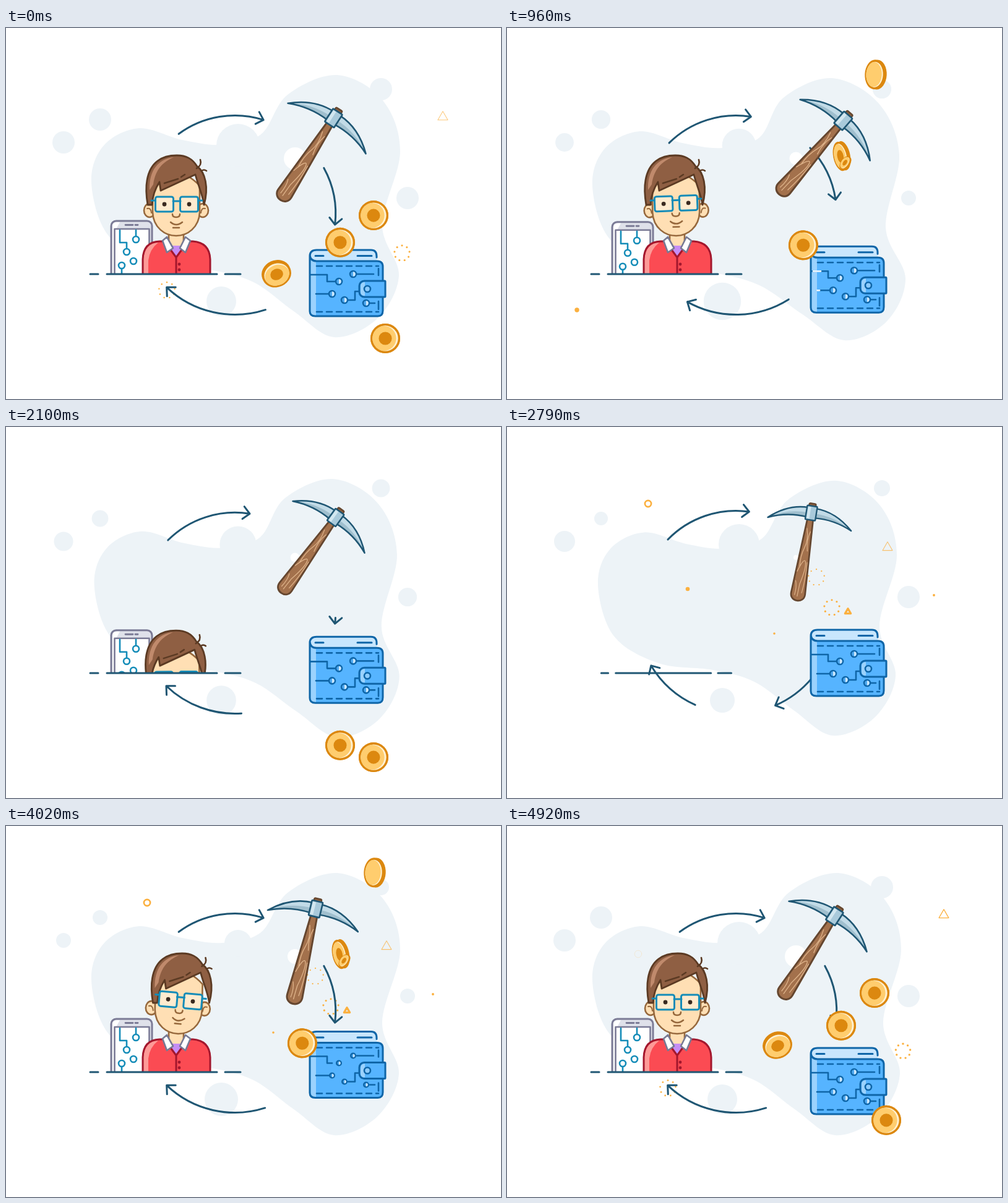
Write an HTML page with a canvas that moves like this. It is 800 by 600 pixels and loops after 4950 ms.

```html
<!DOCTYPE html>
<html lang="en">
<head>
<meta charset="utf-8">
<title>Coin mining cycle</title>
<style>
html, body { margin: 0; width: 100%; height: 100%; overflow: hidden; background: #fff; }
canvas { display: block; width: 800px; height: 600px; }
</style>
</head>
<body>
<canvas id="stage" width="800" height="600"></canvas>
<script>
const c = document.getElementById('stage').getContext('2d');
const T = 4950, TAU = Math.PI * 2, RAD = Math.PI / 180;
const NAVY = '#1f5673', PALE = '#edf3f7', GOLD = '#fbb03f', RIM = '#dc880f', BLUE = '#0f66a8', TEAL = '#148cb8';
const TIMES = [0, 480, 1380, 2790, 3540, 4020, 4920];

const mix = (a, b, u) => a + (b - a) * u;
const clamp = u => Math.min(1, Math.max(0, u));
const smooth = u => u * u * (3 - 2 * u);

// Eased value from [time, value] pairs, wrapping to the first
function key(t, ...list) {
  const k = [...list, [T, list[0][1]]];
  let i = 0;
  while (i < k.length - 2 && t >= k[i + 1][0]) i++;
  const u = clamp((t - k[i][0]) / (k[i + 1][0] - k[i][0]));
  return mix(k[i][1], k[i + 1][1], smooth(u));
}
const pose = (t, ...vals) => key(t, ...vals.map((v, i) => [TIMES[i], v]));

function paint(fill, stroke, width = 3) {
  if (fill) { c.fillStyle = fill; c.fill(); }
  if (stroke) { c.strokeStyle = stroke; c.lineWidth = width; c.stroke(); }
}
function disc(x, y, r, fill, stroke, width) {
  c.beginPath(); c.arc(x, y, Math.max(0, r), 0, TAU); paint(fill, stroke, width);
}
function oval(x, y, rx, ry, fill, stroke, width) {
  c.beginPath(); c.ellipse(x, y, Math.max(.5, rx), ry, 0, 0, TAU); paint(fill, stroke, width);
}
function shape(d, fill, stroke, width = 3) {
  const p = new Path2D(d);
  if (fill) { c.fillStyle = fill; c.fill(p); }
  if (stroke) { c.strokeStyle = stroke; c.lineWidth = width; c.stroke(p); }
}
function box(x, y, w, h, r, fill, stroke, width) {
  c.beginPath(); c.roundRect(x, y, w, h, r); paint(fill, stroke, width);
}
function group(fn) { c.save(); fn(); c.restore(); }

// ---- background
const outline = [
  [138, 250], [158, 190], [215, 162], [285, 181], [350, 189], [412, 172], [455, 108],
  [535, 76], [608, 116], [637, 200], [608, 318], [635, 400], [600, 470], [530, 500],
  [465, 458], [400, 411], [330, 391], [240, 380], [165, 335]
];
const right = x => clamp((x - 200) / 250);
const wide = ([x, y]) => [x, y];
const sheared = ([x, y]) => [x + right(x) * (.06 * (y - 300) + 3), y + 5];
const shrunk = ([x, y]) => [x * .968 + 13.4, y * .972 + 13];
const leaning = ([x, y]) => [
  x * .936 + 26 + .13 * (y - 390) * right(x),
  y * .913 + 21.6 + 18 * clamp((400 - x) / 100)
];
const moods = [wide, sheared, sheared, shrunk, leaning, wide, wide];

function blob(t) {
  const p = outline.map(q => [0, 1].map(k => pose(t, ...moods.map(m => m(q)[k]))));
  const n = p.length, at = i => p[(i + n) % n];
  c.beginPath();
  c.moveTo(...p[0]);
  for (let i = 0; i < n; i++) {
    const [a, b, d, e] = [at(i - 1), at(i), at(i + 1), at(i + 2)];
    c.bezierCurveTo(
      b[0] + (d[0] - a[0]) / 6, b[1] + (d[1] - a[1]) / 6,
      d[0] - (e[0] - b[0]) / 6, d[1] - (e[1] - b[1]) / 6, ...d);
  }
  paint(PALE);
}
function backdrop(t) {
  blob(t);
  disc(152, 148, pose(t, 18, 14, 16, 11, 13, 12, 18), PALE);
  disc(93, 185, pose(t, 18, 16, 14, 17, 10, 12, 18), PALE);
  disc(606, 99, pose(t, 18, 14, 16, 13, 13, 13, 18), PALE);
  disc(649, 275, pose(t, 18, 12, 12, 18, 1, 12, 18), PALE);
  disc(348, 442, pose(t, 24, 33, 28, 20, 26, 27, 24), PALE);
  disc(375, 190, pose(t, 35, 29, 26, 33, 22, 22, 35), PALE);
  disc(467, 211, pose(t, 18, 10, 11, 4, 3, 12, 18), '#fff');
}

// ---- sparks grow, thin out and fade
const LIFE = 500;
const fan = (n, fn) => {
  for (let i = 0; i < n; i++) fn(Math.cos(i * TAU / n - Math.PI / 2), Math.sin(i * TAU / n - Math.PI / 2));
};
function dot(x, y, p) { disc(x, y, 3.3 * Math.sin(Math.PI * p), GOLD); }
function ring(x, y, p) { disc(x, y, 5.8 * (1 - (1 - p) ** 3), null, GOLD, 4.9 - 4.4 * p); }
function tri(x, y, p) {
  const r = 9.5 * (1 - (1 - p) ** 2);
  c.beginPath();
  fan(3, (dx, dy) => c.lineTo(x + r * dx, y + r * dy));
  c.closePath();
  paint(null, GOLD, 4.9 - 4.5 * p);
}
function crown(x, y, p) {
  const r = 13 * (1 - (1 - p) ** 3);
  fan(9, (dx, dy) => disc(x + r * dx, y + r * dy, 2.9 - 2.2 * p, GOLD));
}
function sparks(t) {
  // p is how far the spark has come at the given moment
  const at = when => (kind, x, y, p) => {
    const q = ((t - when + p * LIFE + T) % T) / LIFE;
    if (q <= 0 || q >= 1) return;
    c.globalAlpha = Math.min(1, (1 - q) * 5);
    kind(x, y, q);
    c.globalAlpha = 1;
  };
  let s = at(4920);
  s(tri, 706, 144, .8);
  s(crown, 640, 364, .55);
  s(crown, 260, 424, .7);
  s(ring, 212, 207, .95);
  s = at(480);
  s(dot, 478, 107, .2);
  s(dot, 590, 111, .5);
  s(dot, 209, 167, .2);
  s(ring, 557, 247, .5);
  s(tri, 555, 346, .85);
  s(crown, 648, 377, .6);
  s(tri, 635, 391, .3);
  s = at(1380);
  s(crown, 326, 157, .7);
  s(dot, 159, 280, .4);
  s(tri, 207, 294, .6);
  s(ring, 421, 281, .5);
  s(ring, 113, 456, .93);
  s(crown, 484, 443, .7);
  for (const when of [2790, 4020]) {
    s = at(when);
    s(ring, 228, 124, .5);
    s(crown, 500, 243, .8);
    s(crown, 525, 292, .62);
    s(tri, 551, 299, .33);
    s(tri, 615, 195, .85);
    s(dot, 690, 272, .2);
    s(dot, 432, 334, .18);
    s(dot, 292, 262, .5);
  }
  s = at(3540);
  s(dot, 193, 159, .28);
  s(crown, 343, 188, .68);
  s(tri, 312, 238, .4);
  s(crown, 313, 335, .13);
  s(dot, 407, 410, .3);
  s(dot, 500, 242, .18);
  s(ring, 537, 225, .5);
  s(tri, 532, 504, .93);
}

// ---- arrows run clockwise on circles
function arrow(cx, cy, r, tail, tip) {
  if (tip - tail < 2) return;
  const a = tip * RAD, x = cx + r * Math.cos(a), y = cy + r * Math.sin(a);
  c.beginPath();
  c.arc(cx, cy, r, tail * RAD, a);
  for (const side of [-44, 44]) {
    const b = a - Math.PI / 2 + side * RAD;
    c.moveTo(x, y);
    c.lineTo(x + 14.5 * Math.cos(b), y + 14.5 * Math.sin(b));
  }
  paint(null, NAVY);
}
function arrows(t) {
  const top = pose(t, -72.5, -82, -80, -82, -79, -72.5, -72.5);
  arrow(370, 295 + pose(t, 0, 0, 0, -6, 0, 0, 0), 153.5, Math.max(-137, top - 53.8), top);

  const side = key(t, [0, 6.8], [480, -17.5], [1380, -1], [1700, 6.8], [2200, 6.8], [2201, -53], [2790, -53], [3540, -12.8], [4020, 6.8]);
  const lag = key(t, [0, 35.6], [1700, 35.6], [2200, 0], [2790, 0], [2850, 35.6]);
  arrow(380, 300, 152.7, Math.max(-53, side - lag), side);

  if (t < 3000) {
    const tip = key(t, [0, 133.6], [480, 121.4], [1380, 117.8], [2790, 149], [3000, 150]);
    arrow(370, 303.5, 160, tip - key(t, [0, 61.6], [1380, 61.6], [2790, 34.7], [3000, 0]), tip);
  }
  if (t > 2500) {
    const tip = key(t, [2500, 40], [2790, 66.6], [3540, 129.8], [4020, 133.6]);
    const end = t > 4020 ? 133.6 : tip;
    arrow(370, 303.5, 160, Math.max(40, end - 61.3), end);
  }
}

// ---- pickaxe, drawn upright from the end of its handle
function pickaxe(t) {
  group(() => {
    c.translate(pose(t, 449, 467, 429, 470, 421, 466, 449), pose(t, 270, 277, 249, 272, 234, 278, 270));
    c.rotate(RAD * pose(t, 32.9, 12.8, 64.1, 9.3, 80.7, 13.5, 32.9));
    const s = pose(t, 1, 1, 1, .91, 1.08, 1, 1);
    c.scale(s, s);
    shape('M-5 -138L-12.5 -3C-13 14 13 14 12.5 -3L5 -138Z', '#a3714c', '#65462f');
    shape('M-3 -120Q3 -100 -2 -85T-5 -50M4 -115Q-1 -100 4 -80M-8 -42Q1 -70 4 -60T0 -20L-1 2M7 -60Q9 -30 6 -5M-8 -25Q-4 -15 -6 0', null, '#dfb48b', 1.3);
    c.translate(0, -148);
    box(-6, -17, 12, 10, 2, '#8a5e3d', '#65462f', 2.5);
    const blade = 'M75 20Q43 -9 6 -9V8Q42 5 75 20Z';
    for (const f of [1, -1]) group(() => {
      c.scale(f, 1);
      shape(blade, '#c2dbe7');
      shape('M75 20Q42 -1 6 0V8Q42 5 75 20Z', '#a0bfce');
      shape(blade, null, NAVY, 2.6);
    });
    box(-9, -12.5, 18, 25, 1, '#a9cadb', NAVY, 2.6);
    box(-7, -10.5, 5, 21, 0, '#d3e7f0');
  });
}

// ---- one circuit trace with its round end
function trace(d, x, y, color, grow, shaded) {
  if (grow < .01) return;
  c.setLineDash([62 * grow, 200]);
  shape(d, null, color, 2.6);
  c.setLineDash([]);
  disc(x, y, 5 * grow, shaded ? '#4fa9f0' : '#fff', color, 2.6);
  if (!shaded) return;
  c.beginPath();
  c.arc(x, y, 3.7 * grow, -Math.PI / 2, Math.PI / 2);
  paint('#cfe9fd');
}

function wallet(t) {
  group(() => {
    c.translate(0, 466 + pose(t, 0, -3.5, -7.5, -31, -18, -26.5, 0));
    c.scale(1, pose(t, 1, 1, 1, 1, .92, 1, 1));
    c.translate(0, -466);
    shape('M491 385V370Q491 359 502 359H590Q599 359 599 369V380H491Z', '#c8e6fd');
    box(491, 377, 118, 89, 8, '#56b4ff');
    shape('M492 372Q494 377 501 377V466Q492 465 491 458Z', '#9bd2fd');
    shape('M599 371V369Q599 359 590 359H502Q491 359 491 369V458Q491 466 500 466H601Q609 466 609 457V386Q609 377 600 377H502Q492 377 491 367M500 368.5H513M568 368.5H591', null, BLUE);
    c.setLineDash([9, 7]);
    shape('M502 385H602M502 459H602', null, BLUE, 2.6);
    c.setLineDash([]);
    shape('M602 389V400M602 442V455', null, BLUE, 2.6);

    const grow = key(t, [0, 1], [2790, 1], [3150, 0], [3560, 0], [4250, 1]);
    const wire = (d, x, y) => trace(d, x, y, BLUE, grow, true);
    wire('M492 399H519V410H533', 538, 410);
    wire('M501 430H522', 527, 430);
    wire('M594 398H567', 561, 398);
    wire('M572 426H564V440H553', 547, 440);
    wire('M596 445H588', 582, 445);

    c.globalAlpha = clamp(Math.min((t - 300) / 120, (1650 - t) / 200));
    shape('M495 399H507M501 430H505', null, '#eaf6ff', 2.8);
    c.globalAlpha = 1;
    box(571, 409, 42, 26, [8, 1, 1, 8], '#56b4ff', BLUE);
    shape('M580 411Q573 411 573 418V427Q573 433 580 433Z', '#9bd2fd');
    const knob = key(t, [0, 1], [3150, 1], [3450, .2], [3600, .2], [3900, 1]);
    disc(584, 422, 5 * knob, '#8ccbff', BLUE, 2.6 * Math.max(.5, knob));
  });
}

// ---- desk
function phone(t) {
  const y = key(t, [0, 0], [480, 2], [2000, 1], [2400, 100], [3250, 100], [3540, 26], [3800, 0]);
  if (y > 90) return;
  group(() => {
    const edge = '#7b7b96';
    c.translate(0, y);
    box(170, 312, 66, 100, 8, '#dfe1ea', edge);
    shape('M172 400V320Q172 314 180 314H184L178 325V400Z', '#fff');
    box(175.5, 325, 56, 100, 0, '#fff', edge, 2.6);
    shape('M193 318.5H205M209 318.5H213', null, edge, 2.8);
    const grow = key(t, [0, 1], [2250, 1], [2400, 0], [3560, 0], [4000, 1]);
    const wire = (d, x, y) => trace(d, x, y, TEAL, grow);
    wire('M184 327V347H195V357', 195, 362);
    wire('M210 327V337', 210, 342);
    wire('', 206, 377);
    wire('M187 398V389', 187, 384);
  });
}

const SKIN = '#ffdfb4', SKINLINE = '#96683c', DARK = '#5b3a23', WINE = '#a3172d';
const HAIR = 'M229 286Q225 262 228 246C233 217 252 206 276 206C291 206 301 211 309 224C322 233 328 258 320 286C318 270 311 256 306 237L250 263L248 249Q237 266 236 286Z';
const COAT = 'M221 410V374Q222 346 248 345H256L275 371L294 345H302Q329 347 330 374V410Z';

function head(t) {
  const turn = pose(t, 0, -7, -3, 0, 0, 10, 0);
  group(() => {
    c.translate(275 + turn * .3, 336);
    c.rotate(turn * .002);
    c.translate(-275, -336);
    for (const s of [-1, 1]) group(() => {
      c.translate(275 + s * 43 - turn * .1, 295);
      c.scale(s, 1);
      oval(0, 0, 9, 11, SKIN, SKINLINE, 2.6);
      shape('M4 -3Q-2 -5 -3 4', null, SKINLINE, 2);
    });
    shape('M237 255V298C238 323 257 336 275 336C293 336 312 323 313 298V255Q275 215 237 255Z', SKIN, SKINLINE, 2.6);
  });
  group(() => {
    c.translate(turn * .85, 0);
    shape(HAIR, '#8f5f43');
    shape('M232 262C231 230 246 212 271 209C254 217 242 227 238 253Z', '#c08a6c');
    shape(HAIR, null, DARK, 2.8);
    shape('M256 251L278 244M283 241L289 237M308 227Q317 222 314 213M316 231Q320 228 324 231', null, DARK, 2.6);
  });
  group(() => {
    c.translate(276 + turn * .6, 285 - Math.abs(turn) * .3);
    c.rotate(RAD * pose(t, 0, -3.5, -1, 0, 0, 5, 0));
    const open = 3.4 - 2 * clamp(1 - Math.abs(t - 480) / 90);
    for (const s of [-20, 20]) {
      box(s - 14.5, -12, 29, 24, 3, '#ffebcf', TEAL);
      oval(s, 0, 3.4, open, '#3a2a20');
    }
    shape('M-6 -5H6M-41 -6H-35M35 -6H41', null, TEAL);
    shape('M-7 16Q-7 21 -1 21Q5 21 5 16M-10 29Q-1 37 9 29M-6 38H4', null, SKINLINE, 2.5);
  });
}
function man(t) {
  const y = key(t, [0, 0], [1850, 0], [2300, 210], [3560, 210], [3920, 0]);
  if (y > 205) return;
  group(() => {
    c.translate(0, y);
    box(263, 322, 24, 42, 0, SKIN, SKINLINE, 2.6);
    shape('M258 352H292L276 373Z', '#c58df5');
    shape(COAT, '#fb4b53');
    shape('M222 410V374Q224 348 246 347Q232 358 230 376V410Z', '#fd9a97');
    shape(COAT + 'M275 371V400', null, WINE);
    disc(280, 382, 2.4, WINE);
    disc(280, 391, 2.4, WINE);
    shape('M260 338L270 356L260 363L253 344ZM290 338L281 356L290 363L298 344Z', '#fff', '#777a94', 2.6);
    head(t);
  });
}
function desk(t) {
  group(() => {
    c.beginPath(); c.rect(0, 0, 800, 398); c.clip();
    phone(t);
    man(t);
  });
  const s = key(t, [0, 1], [2150, 1], [2450, 0], [2520, 0], [2790, .865], [3540, .99], [4020, 1]);
  if (s < .01) return;
  c.beginPath();
  for (const [a, b] of [[-121, -108], [-94, 84], [97, 122]]) {
    c.moveTo(257 + a * s, 398);
    c.lineTo(257 + b * s, 398);
  }
  paint(null, NAVY);
}

// ---- coins
function coin(x, y, r, sx, turn, badge) {
  const k = r / 24, edge = 2.5 * k * Math.sqrt(Math.max(0, 1 - sx * sx));
  group(() => {
    c.translate(x, y);
    c.rotate(turn);
    oval(edge, 0, r * sx, r, RIM);
    oval(-edge, 0, r * sx, r, RIM);
    c.translate(-edge, 0);
    oval(0, 0, r * .86 * sx, r * .86, '#fff1d2');
    c.clip();
    oval(-2.5 * k * sx, 0, r * .84 * sx, r * .84, '#ffcd6e');
    if (badge > .5) oval(0, 0, r * .44 * sx, r * .44, RIM);
  });
}
// Stops are [time, x, y, radius, width ratio, turn, badge]; after the last the coin drops
function toss(t, speed, ...stops) {
  const last = stops[stops.length - 1];
  if (t < stops[0][0]) return;
  if (t >= last[0]) {
    const [t0, x, y, ...look] = last, low = y + speed * (t - t0);
    if (low < 640) coin(x, low, ...look);
    return;
  }
  const i = stops.findIndex(k => k[0] > t), a = stops[i - 1], b = stops[i];
  const u = (t - a[0]) / (b[0] - a[0]), fall = t < 900 ? u * (2 - u) : u * u;
  coin(...a.map((n, j) => mix(n, b[j], j === 2 ? fall : u)).slice(1));
}
function burst(time, start) {
  let t = (time - start + T) % T;
  if (t > T - 200) t -= T;
  toss(t, 1.1, [-90, 530, 130, 1, 1, 0, 0], [0, 539, 104, 13, 1, 0, 0], [480, 596, 75, 24, .66, .05, 0], [900, 594, 152, 24, .14, .05, 0], [1380, 594, 269, 24, 1, 0, 1]);
  toss(t, 1, [-120, 490, 240, 1, .9, -.6, 0], [0, 476, 209, 24, .9, -.6, 0], [480, 541, 207, 24, .48, -.2, 1], [900, 539, 242, 24, .42, -1.42, 0]);
  toss(t, 1.43, [330, 520, 360, 1, 1, 0, 1], [480, 479, 352, 24, 1, .1, 1], [900, 433, 203, 24, .86, -.7, 0], [1380, 437, 353, 24, .85, -2, 1]);
  toss(t, .8, [440, 545, 212, 1, .6, .6, 1], [480, 547, 218, 12, .55, .6, 1], [900, 545, 302, 24, .86, -.5, 1], [1380, 540, 322, 24, 1, 0, 1]);
  toss(t, .87, [540, 560, 230, 1, .5, 0, 0], [900, 594, 214, 24, .93, 0, 1], [1380, 613, 475, 24, 1, 0, 1]);
  toss(t, .8, [700, 575, 300, 1, .5, 0, 0], [900, 611, 400, 13, .45, -.25, 0]);
}

function draw(t) {
  c.fillStyle = '#fff';
  c.fillRect(0, 0, 800, 600);
  c.lineCap = c.lineJoin = 'round';
  backdrop(t);
  sparks(t);
  arrows(t);
  pickaxe(t);
  wallet(t);
  desk(t);
  burst(t, 480);
  burst(t, 3540);
}

const begin = performance.now();
function tick() {
  draw((performance.now() - begin) % T);
  requestAnimationFrame(tick);
}
tick();
</script>
</body>
</html>
```
